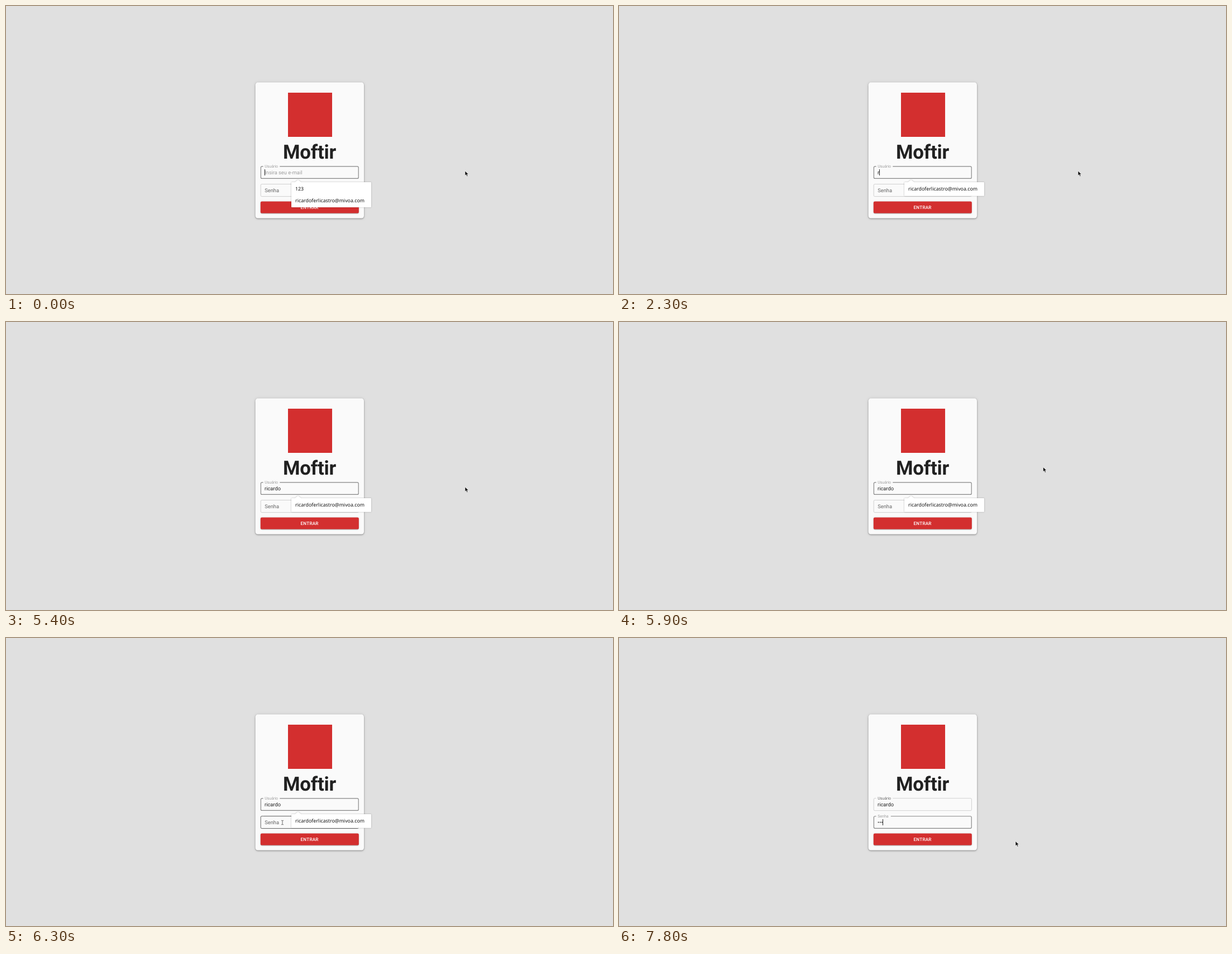
Write an HTML page that moves like this. It is 1087x515 px and loops after 8 s.

```html
<!DOCTYPE html>
<html lang="pt-BR">
<head>
<meta charset="utf-8">
<title>Login</title>
<style>
  html, body { margin: 0; width: 100%; height: 100%; overflow: hidden; background: #e0e0e0; }
  svg { display: block; width: 1087px; height: 515px; }
  text { font: 9.3px Roboto, sans-serif; fill: #212121; text-rendering: geometricPrecision; white-space: pre; }
  .title { font-size: 34.9px; font-weight: 700; letter-spacing: -.00833em; text-anchor: middle; }
  .enter { font-size: 8.13px; font-weight: 500; letter-spacing: .02857em; text-anchor: middle; fill: #fff; }
  .filled { font: 7.75px "Liberation Sans", Arial, sans-serif; fill: #000; }
  #popup text { font: 8.8px "Noto Sans", sans-serif; fill: #111; }
  .card {
    filter: drop-shadow(0 1.2px 1.1px rgba(0,0,0,.22)) drop-shadow(0 1.6px 1.4px rgba(0,0,0,.15))
      drop-shadow(0 .6px 2.9px rgba(0,0,0,.1));
  }
  .button { filter: drop-shadow(0 1.1px .5px rgba(0,0,0,.24)) drop-shadow(0 .6px 1.4px rgba(0,0,0,.14)); }
  #panel { filter: drop-shadow(0 .5px 1.3px rgba(0,0,0,.3)); }
  .border { fill: none; }
</style>
</head>
<body>
<svg viewBox="0 0 1087 515">
  <rect class="card" x="446.6" y="136.6" width="194.4" height="243" rx="4.6" fill="#fafafa"/>
  <rect x="505" y="155" width="79" height="79" fill="#d32f2f"/>
  <text class="title" x="543.5" y="272.8">Moftir</text>

  <rect id="autofill" x="456.3" y="286.8" width="174.9" height="21.7" rx="2" fill="#e8f0fe"/>
  <g id="user">
    <path class="border"/>
    <text class="label">Usuário</text>
    <text class="hint" x="463" y="300.9">Insira seu e-mail</text>
    <text class="value" x="463" y="300.9"></text>
  </g>
  <text id="preview" class="filled" x="463" y="300.8">ricardoferlicastro@mivoa.com</text>
  <g id="pass">
    <path class="border"/>
    <text class="label">Senha</text>
    <text class="hint" x="463" y="332.7">Insira sua senha</text>
    <text class="value" x="463" y="332.7"></text>
  </g>
  <rect id="caret" width="1" height="11" fill="#212121"/>

  <rect class="button" x="455.8" y="349.5" width="176" height="21" rx="2.3" fill="#d32f2f"/>
  <text class="enter" x="543.6" y="362.7">ENTRAR</text>

  <g id="popup">
    <g id="panel" fill="#fff">
      <path d="M517 315.5L523 310.8L529 315.5Z"/>
      <rect id="sheet" x="511" y="315" width="143" rx="1"/>
    </g>
    <rect id="hover" x="511" y="317" width="143" height="20.3" fill="#e8e8e8"/>
    <text id="first" x="518" y="330.3">123</text>
    <text id="mail" x="518">ricardoferlicastro@mivoa.com</text>
  </g>

  <path id="arrow" d="M0 0V8.3L2 6.5L3.5 9.7L5 9L3.6 6H6.3Z" fill="#111" stroke="#fff" stroke-width=".6" stroke-linejoin="round"/>
  <path id="beam" d="M-2 -3.7H-.6L0 -3.1L.6 -3.7H2M0 -3.1V3.1M-2 3.7H-.6L0 3.1L.6 3.7H2" fill="none" stroke="#444" stroke-width=".8"/>
</svg>
<script>
const $ = id => document.getElementById(id);
const set = (el, attrs) => { for (const k in attrs) el.setAttribute(k, attrs[k]); };
const show = (el, on) => { el.style.display = on ? '' : 'none'; };
const clamp = v => Math.min(1, Math.max(0, v));
const easeOut = v => 1 - (1 - clamp(v)) ** 2.4;
const past = (times, t) => times.filter(k => k <= t).length;

const LOOP = 8000, STEP = 100, FOCUS = 6600;
const NAME = 'ricardo';
const nameKeys = [2300, 2400, 2500, 2700, 3600, 4700, 4800];
const passKeys = [7600, 7700, 7800];
const blinks = [100, 700, 1300, 1900, 3300, 3600, 4200, 4700, 5400, FOCUS, 7200, 7600];
// time, x, y of the pointer
const route = [
  [5600, 822, 295], [5700, 905, 252], [5800, 850, 248], [5900, 759.5, 259.5],
  [6000, 630, 297], [6100, 519.5, 331.5], [6200, 503, 329], [6300, 495, 330],
  [6400, 491, 331], [6500, 489, 330], [6600, 489, 331], [6700, 539.5, 341.5],
  [6800, 645, 356], [6900, 710, 363.5]
];

function pointer(t) {
  const i = route.findIndex(p => p[0] > t);
  if (i === 0) return route[0].slice(1);
  if (i < 0) return route[route.length - 1].slice(1);
  const [a, b] = [route[i - 1], route[i]], k = (t - a[0]) / (b[0] - a[0]);
  return [a[1] + (b[1] - a[1]) * k, a[2] + (b[2] - a[2]) * k];
}

// Rounded outline with a gap in its top edge for the label
function outline(top, gap, inset) {
  const l = 455.8 + inset, r = 631.8 - inset, y = top + inset, b = top + 22.7 - inset, q = 2;
  return `M${460.6 + gap} ${y}H${r - q}Q${r} ${y} ${r} ${y + q}V${b - q}Q${r} ${b} ${r - q} ${b}` +
    `H${l + q}Q${l} ${b} ${l} ${b - q}V${y + q}Q${l} ${y} ${l + q} ${y}H460.6`;
}

function drawField(id, top, gap, { focus, hovered, shrink, notch, hint, value }) {
  const [border, label, hintText, valueText] = $(id).children;
  const width = focus ? 1.16 : .7;
  set(border, {
    d: outline(top, gap * notch, width / 2),
    stroke: focus ? '#858585' : hovered ? '#212121' : '#bfbfbf',
    'stroke-width': width
  });
  set(label, { x: 463.2, y: top + 14.4 - 12.1 * shrink });
  label.style.fontSize = 9.3 - 2.3 * shrink + 'px';
  label.style.fill = focus && shrink === 1 ? '#9e9e9e' : '#666';
  hintText.style.opacity = value ? 0 : .42 * hint;
  valueText.textContent = value;
  return valueText;
}

function draw(t) {
  const [x, y] = pointer(t);
  const onPass = t >= FOCUS;
  const typed = NAME.slice(0, past(nameKeys, t));
  const dots = '•'.repeat(past(passKeys, t));
  const inField = top => x > 456 && x < 632 && y > top && y < top + 24;
  const overPopup = t < FOCUS && x > 511 && x < 654 && y > 315 && y < 340;
  const overPass = inField(318.2) && !overPopup;
  const since = t - FOCUS;
  const shrink = easeOut(since / 200);

  const userValue = drawField('user', 286.3, 29.6, {
    focus: !onPass, shrink: 1, notch: 1, hint: 1, value: typed
  });
  const passValue = drawField('pass', 318.2, 26.2, {
    focus: onPass, hovered: overPass, shrink, notch: easeOut((since - 50) / 100),
    hint: easeOut(since / 200), value: dots
  });
  show(userValue, !overPopup);
  show($('preview'), overPopup);
  show($('autofill'), overPopup);

  const value = onPass ? passValue : userValue;
  const length = value.textContent && !overPopup ? value.getComputedTextLength() : 0;
  set($('caret'), { x: Math.floor(463 + length), y: onPass ? 324 : 292 });
  show($('caret'), past(blinks, t) % 2 === 0 && !overPopup);

  const fade = clamp(1 - since / 200), scale = .95 + .05 * fade;
  const rows = typed ? 1 : 2;
  show($('popup'), fade > 0);
  set($('popup'), {
    opacity: fade,
    transform: `translate(582.5 327) scale(${scale}) translate(-582.5 -327)`
  });
  set($('sheet'), { height: 4.3 + 20.4 * rows });
  set($('mail'), { y: 309.9 + 20.4 * rows });
  show($('first'), rows === 2);
  show($('hover'), overPopup);

  const beam = overPass || inField(286.3);
  for (const id of ['arrow', 'beam']) {
    show($(id), (id === 'beam') === beam);
    set($(id), { transform: `translate(${x} ${y})` });
  }
}

function frame() {
  draw(Math.floor(performance.now() % LOOP / STEP) * STEP);
  requestAnimationFrame(frame);
}
frame();
</script>
</body>
</html>
```
